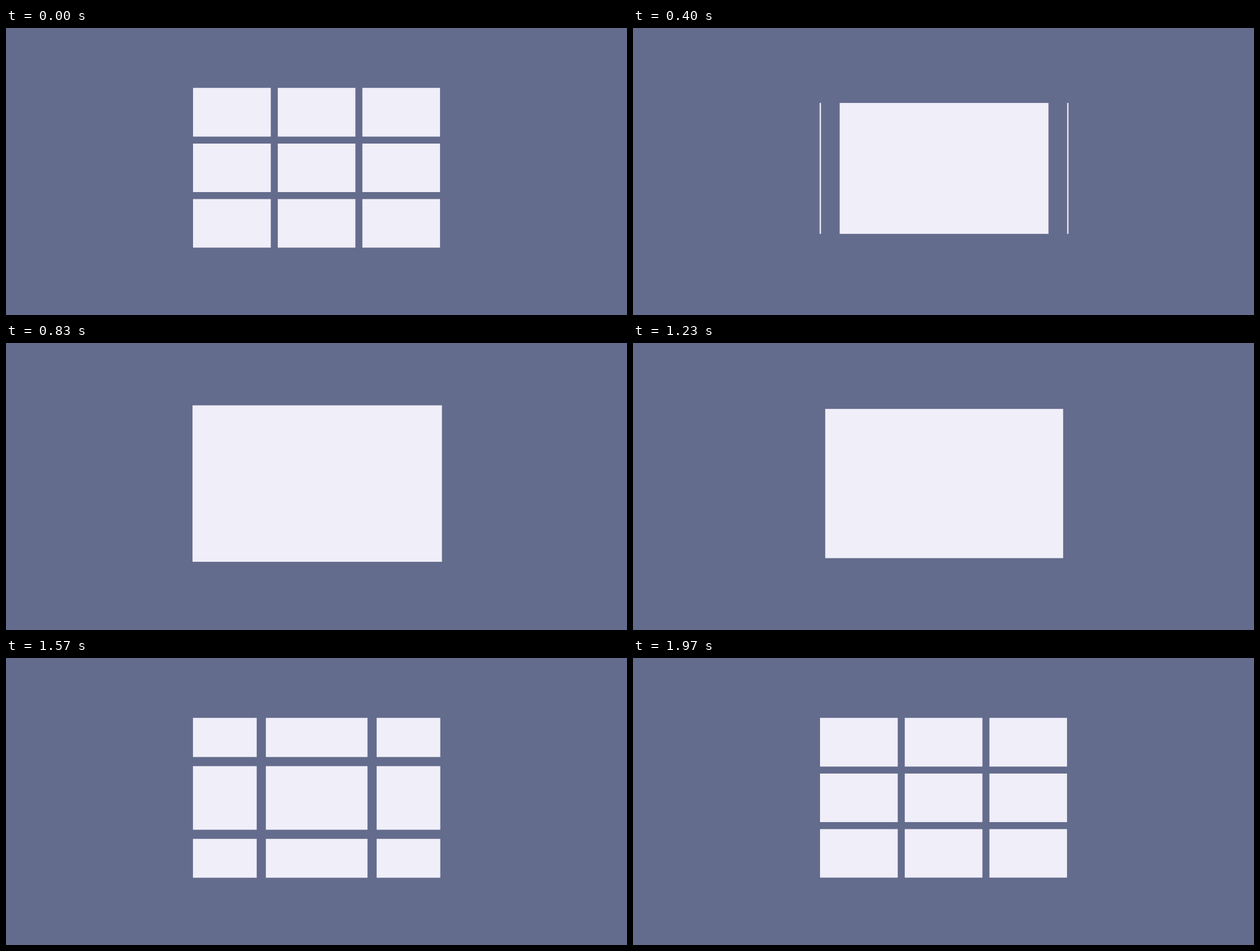
An HTML page with a canvas for the animation above (2010 ms loop, 1099 px wide and 509 px high).

```html
<!DOCTYPE html>
<html lang="en">
<head>
<meta charset="utf-8">
<title>Grid zoom</title>
<style>
  html, body { margin: 0; width: 100%; height: 100%; overflow: hidden; background: #646c8d; }
  canvas { display: block; }
</style>
</head>
<body>
<canvas id="stage" width="1099" height="509"></canvas>
<script>
const ctx = document.getElementById('stage').getContext('2d');
const LOOP = 2010;
const BACK = '#646c8d';
const CELL = '#f0eef8';

const mix = (a, b, p) => a + (b - a) * p;

// cubic-bezier(x1, 0, x2, 1)
function ease(x, x1, x2) {
  if (x <= 0) return 0;
  if (x >= 1) return 1;
  let lo = 0, hi = 1;
  for (let i = 0; i < 30; i++) {
    const s = (lo + hi) / 2, r = 1 - s;
    if (3 * r * r * s * x1 + 3 * r * s * s * x2 + s * s * s < x) lo = s;
    else hi = s;
  }
  return lo * lo * (3 - 2 * lo);
}

// 30 steps per second, with start times rounded to 10 ms
const stepAt = t => Math.min(59, Math.floor((Math.floor(t / 10) * 3 + 1) / 10));

function zoomAt(t) {
  const step = stepAt(t);
  return step < 32
    ? ease(step / 26, 0.547, 0.067)
    : 1 - ease((step - 32) / 28, 0.507, 0.058);
}

// Start and end of the three bands along one axis
function bands(outerA, outerB, a, b, gap) {
  return [[outerA, a - gap], [a, b], [b + gap, outerB]];
}

function draw(t) {
  const p = zoomAt(t);
  const gap = mix(12.4, 39.5, p);
  const cols = bands(mix(331, 330.1, p), mix(768.1, 771.5, p),
                     mix(481, 330, p), mix(618.3, 771.6, p), gap);
  const rows = bands(106.2, mix(389.5, 390.8, p),
                     mix(205, 110.5, p), mix(291, 388.1, p), gap);
  ctx.fillStyle = BACK;
  ctx.fillRect(0, 0, 1099, 509);
  ctx.fillStyle = CELL;
  for (const [x1, x2] of cols) {
    for (const [y1, y2] of rows) {
      if (x2 > x1 && y2 > y1) ctx.fillRect(x1, y1, x2 - x1, y2 - y1);
    }
  }
}

const start = performance.now();
function tick() {
  draw((performance.now() - start) % LOOP);
  requestAnimationFrame(tick);
}
tick();
</script>
</body>
</html>
```
